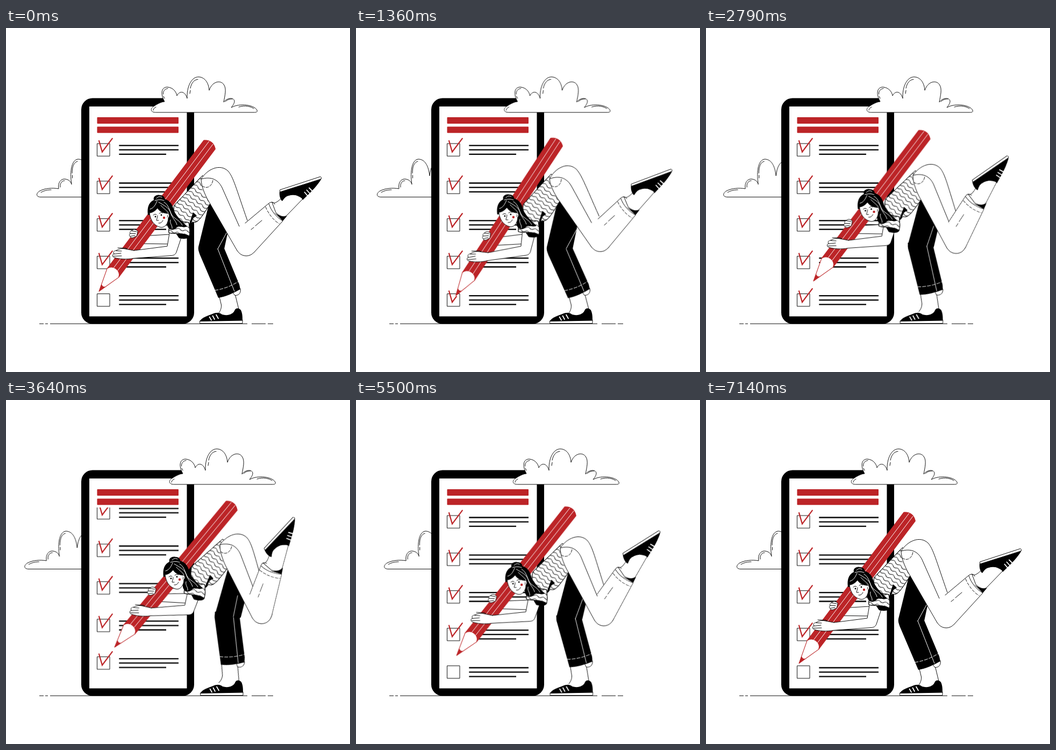
An HTML page without scripts for the animation above (7.21 s loop, 640 by 640 pixels).

```html
<!DOCTYPE html>
<html lang="en">
<head>
<meta charset="utf-8">
<title>Checklist</title>
<style>
  html, body { margin: 0; width: 100%; height: 100%; overflow: hidden; background: #fff; }
  svg { display: block; width: 100%; height: 100%; }

  .ink { fill: #fff; stroke: #111; stroke-width: 1; stroke-linecap: round; stroke-linejoin: round; }
  .line { fill: none; }
  .black { fill: #000; stroke: none; }
  .bare { stroke: none; }
  .white { fill: none; stroke: #fff; }
  .red { fill: #bc2427; stroke: none; }
  .tick { fill: none; stroke: #bc2427; stroke-width: 2.2; stroke-linecap: butt; stroke-linejoin: miter; }

  .part, .list, .front, .back, .draw { animation: 7.21s infinite; transform-box: view-box; }
  .part { animation-name: pose; }
  .list { animation-name: scroll; }
  .front { animation-name: front; }
  .back { animation-name: back; }
  .draw { animation-name: draw; stroke-dasharray: 100 100; }

  /* Every limb passes through the same poses: rest, down stroke, up stroke, stand back. */
  @keyframes pose {
    0%, 1.4%, 99%, 100% { transform: translate(0px, 0px) rotate(0deg); animation-timing-function: cubic-bezier(.45,0,.55,1); }
    12.2% { transform: var(--down); animation-timing-function: cubic-bezier(.45,0,.55,1); }
    26.8%, 29.2% { transform: var(--up); animation-timing-function: cubic-bezier(.5,0,.5,1); }
    46.8%, 56.2% { transform: var(--away); animation-timing-function: cubic-bezier(.4,0,.5,1); }
  }
  @keyframes draw {
    0%, 1.4% { stroke-dashoffset: 100; animation-timing-function: cubic-bezier(.45,0,.55,1); }
    12.2% { stroke-dashoffset: 58; animation-timing-function: cubic-bezier(.45,0,.55,1); }
    26.8%, 100% { stroke-dashoffset: 0; }
  }
  @keyframes scroll {
    0%, 43% { transform: translateY(0px); animation-timing-function: cubic-bezier(.37,0,.63,1); }
    65.9%, 100% { transform: translateY(-69.9px); }
  }
  @keyframes front {
    0%, 100% { transform: translateX(0px); animation-timing-function: cubic-bezier(.6,0,.4,1); }
    57.5% { transform: translateX(34.5px); animation-timing-function: cubic-bezier(.6,0,.4,1); }
  }
  @keyframes back {
    0%, 100% { transform: translateX(0px); animation-timing-function: cubic-bezier(.7,0,.3,1); }
    32.7% { transform: translateX(-25px); animation-timing-function: cubic-bezier(.6,0,.4,1); }
  }

  .hold { transform-origin: 173px 490px; --down: translate(4.3px,17px) rotate(-4.1deg); --up: translate(24px,-4px) rotate(-3.2deg); --away: translate(29px,-30px) rotate(2.6deg); }
  .head { --down: translate(-5px,-2px) rotate(0deg); --up: translate(4px,0px) rotate(0deg); --away: translate(29px,-19px) rotate(0deg); }
  .torso { transform-origin: 322px 385px; --down: translate(-5px,-4px) rotate(-1.5deg); --up: translate(5px,0px) rotate(0deg); --away: translate(28px,-20px) rotate(5deg); }
  .thigh { transform-origin: 380px 282px; --down: translate(-8px,-3px) rotate(-8.5deg); --up: translate(4px,0px) rotate(0deg); --away: translate(35px,-11px) rotate(2.9deg); }
  .shin { transform-origin: 447px 405px; --down: translate(0px,0px) rotate(3.9deg); --up: translate(0px,0px) rotate(0deg); --away: translate(0px,0px) rotate(-31.9deg); }
  .thigh2 { transform-origin: 382px 411px; --down: translate(-5px,0px) rotate(-1deg); --up: translate(0px,0px) rotate(0deg); --away: translate(31px,-8px) rotate(2deg); }
  .seam { transform-origin: 394px 411px; --down: translate(-5px,-1px) rotate(0deg); --up: translate(0px,0px) rotate(0deg); --away: translate(29px,-8px) rotate(-17deg); }
  .shin2 { transform-origin: 415px 525px; --down: translate(0px,0px) rotate(-2.4deg); --up: translate(0px,0px) rotate(0deg); --away: translate(-2px,-5px) rotate(15.5deg); }
  .ankle { transform-origin: 415px 528px; --down: translate(0px,0px) rotate(-1.5deg); --up: translate(0px,0px) rotate(0deg); --away: translate(0px,-1px) rotate(9deg); }
  .shoe { --down: translate(0px,0px) rotate(0deg); --up: translate(0px,0px) rotate(0deg); --away: translate(1px,0px) rotate(0deg); }
</style>
</head>
<body>
<svg viewBox="0 0 640 640">
  <defs>
    <clipPath id="page"><path d="M155 200H336.500V536.500H155Z"/></clipPath>
    <pattern id="wave" width="14" height="7.500" patternUnits="userSpaceOnUse" patternTransform="translate(363 277) rotate(37)">
      <path d="M-1 4.500L0 4q3.500-2.800 7 0t7 0l1-.5" fill="none" stroke="#111"/>
    </pattern>
    <pattern id="wave2" href="#wave" patternTransform="translate(305 366) rotate(14)"/>
    <path id="shirt" d="M365 275L313 330C309 350 318 372 335 374L347 361C356 364 362 356 384 320L390 290Z"/>
    <path id="sleeve" d="M308 358C304 368 302 376 303 381C312 384 328 380 341 387C343 378 341 370 340 362Z"/>
    <path id="mark" class="tick" pathLength="100" d="M172.800 209L179 230.500L198.300 204.800"/>
    <g id="row">
      <path d="M169.500 215H193V238.300H169.500Z" fill="none" stroke="#111"/>
      <path d="M210.300 218.600H321M210.300 226.700H321M210.300 234.900H298" fill="none" stroke="#000" stroke-width="2.300"/>
    </g>
    <g id="done"><use href="#row"/><use href="#mark"/></g>
  </defs>

  <g class="ink back">
    <path d="M172 314.500H64C55 314 56 307 63 303C73 298 86 297 98 299C96 288 102 280 110 281C118 282 121 287 122 291C118 264 123 245 134 244C146 244 153 256 155 275C157 258 162 249 172 246Z"/>
    <path class="line" d="M65 306C71 302 79 301 84 301M101 296C100 289 104 284 109 284M123.500 274V279M123 270C123 258 126 250 133 248"/>
  </g>

  <rect x="140" y="130.500" width="210" height="420" rx="21"/>
  <path d="M155 146H336.500V536.500H155Z" fill="#fff"/>
  <rect class="red" x="169.500" y="166" width="151.500" height="12" rx="1"/>
  <rect class="red" x="169.500" y="183.500" width="151.500" height="11.800" rx="1"/>
  <g clip-path="url(#page)">
    <g class="list">
      <use href="#done"/>
      <use href="#done" y="69.900"/>
      <use href="#done" y="139.700"/>
      <use href="#done" y="209.600"/>
      <g transform="translate(0 279.500)">
        <use href="#row"/>
        <path class="tick draw" pathLength="100" d="M172.800 209L179 230.500L198.300 204.800"/>
      </g>
      <use href="#row" y="349.400"/>
    </g>
  </g>
  <path d="M62 550.300H70M73 550.300H78M82 550.300H449M457 550.300H483M487 550.300H497" stroke="#111" stroke-width="1.100"/>

  <g class="ink front">
    <path d="M278 157C268 157 268 149 276 145C282 141 290 137 295 137C286 121 290 109 301 110C311 111 317 119 318 126C323 116 333 117 337 131C336 109 345 91 358 91C369 91 377 101 378 116C384 98 400 97 405 105C411 113 407 126 405 138C412 129 424 129 425 136C425 141 421 145 419 148C435 139 462 143 467 153C468 156 466 157 463 157Z"/>
    <path class="line" d="M295 131L293 127M292.500 123C292 117 296 113 301 112.500M342 122L343 116M343 112C345 101 351 96 357 95.500M408 137C412 133 416 132 421 132M433 147C444 143 456 146 461 150M274 153C274 150 276 149 279 147"/>
  </g>

  <!-- standing leg -->
  <g class="ink">
    <g class="part ankle">
      <path class="bare" d="M396 480L400.500 515L397 532L433 530L434 522L424 480Z"/>
      <path class="line" d="M395 492L400.500 515C401 521 399 526 396 530M423 482L433 523"/>
    </g>
    <g class="part shoe">
      <path d="M361 545L440 543V549.500H361Z"/>
      <path class="black" d="M360.500 546C363 539 376 535 384 532C391 529 397 529 402 533C412 536 423 533 426 524C429 520 434 521 437 525C440 531 440 538 440 544.500Z"/>
      <path class="white" stroke-width="1.800" d="M378.500 537.500L382 543.500M384.500 535.500L388 542M391 533.500L395 540.500"/>
    </g>
    <path class="black part thigh2" d="M381 313L358 407Q357 413 360 419L395 424L406 411L419 350Z"/>
    <g class="part shin2">
      <path d="M422 491L436 485C437.500 493 433 498 426 497.500Z"/>
      <path class="black" d="M358 410L360 420L395 502C408 500 424 493 436 486L434 477L406 410L382 402Z"/>
      <path class="white" d="M394 411L425 490"/>
      <path class="white" stroke-dasharray="6 3" d="M389 488C403 486 420 480 433 471"/>
    </g>
    <path class="white part seam" d="M413 376L394 411"/>
  </g>

  <!-- pencil and arms -->
  <g class="part hold ink">
    <path d="M236 388L304 384L310 402L236 401Z"/>
    <g transform="translate(173 490) rotate(37)">
      <path stroke="#bc2427" d="M0 0L-13.500 -43L-8 -54H8L13.500 -43Z"/>
      <path class="red" d="M0 0L-4.600 -14Q0 -10 4.600 -14Z"/>
      <path class="red" d="M-14 -42V-342Q0 -354 14 -342V-42C11 -49 6 -52 0 -52S-11 -49 -14 -42Z"/>
      <path class="white" stroke-width=".9" d="M-4.500 -52V-346M4.500 -52V-346"/>
    </g>
    <path d="M245 378C242 374 236 374 234 377C231 378 230 380 231 382C229 384 229 387 231 387.500C231 391 236 391 239 389L243 387Z"/>
    <path class="line" d="M234 377.500L243 379M231 382.500L241 382.500M231.500 387.500L240 386"/>
    <path d="M238 414L300 406L306 370L332 372L317 417C315 422 312 423 307 423.500L237 428.500C224 431 211 430 201 427C197 425 198 421 201 420C199 417 201 414 205 414C211 410 217 410 222 411L238 414Z"/>
    <path class="line" d="M201 420.500L214 419M200 424.500L215 424M205 414.500L215 415M208 409L223 409.500L226 411.500"/>
  </g>

  <!-- torso -->
  <g class="part torso ink">
    <use href="#shirt"/>
    <use href="#shirt" style="fill: url(#wave)"/>
    <path class="black" d="M340 368L345 352L348 343L355 349L348 354L344 366Z"/>
    <path class="black" d="M316 382C323 378 336 379 342 386C341 393 330 393 322 391Z"/>
    <use href="#sleeve"/>
    <use href="#sleeve" style="fill: url(#wave2)"/>
  </g>

  <!-- raised leg -->
  <g class="part thigh ink">
    <circle cx="447" cy="405" r="19"/>
    <path class="bare" d="M363 281C375 262 398 252 413 266C423 277 428 298 449 358L464 396L447 405L430.500 415L378 324C366 306 362 295 363 281Z"/>
    <path class="line" d="M430.500 415L378 324C373 316 363 296 363 281C375 262 398 252 413 266C423 277 428 298 449 358M363 281C381 276 394 281 402 297L434 369"/>
    <path class="line" stroke-dasharray="5 2.500" d="M365 294C374 300 383 295 385 283"/>
    <g class="part shin">
      <path class="bare" d="M445 363L488 327L497 323L515 359L461 418L447 405Z"/>
      <path d="M495 324C499 328 505 324 514 315L530 306L553 317L523 348C518 354 508 350 502 343Z"/>
      <path class="black" d="M499 343L515 359L523 349.500C515 353 507 349 499 343Z"/>
      <path class="line" d="M445 363L488 327C492 323 498 323 500 328M489 327C493 340 503 352 515 359L461 418M456 375L461 371M464 368L476 358"/>
      <path class="line" stroke-dasharray="5 3" d="M483 333C488 345 497 357 508 364"/>
      <path class="black" d="M509 304L587 280C582 290 570 303 552 320C549 312 536 309 526 312C520 313 517 318 514 322C510 319 508 311 509 304Z"/>
      <path d="M510 301L585 276.500Q588 278 586 281L510 305Z"/>
      <path class="white" stroke-width="1.800" d="M555.500 305.500L560.500 311.500M559.500 301.500L565 307.500M564 297.500L570 303.500"/>
    </g>
  </g>

  <!-- head -->
  <g class="part head ink">
    <path class="black" d="M264 348C262 334 266 324 275 320C273 313 281 309 287 311C292 311 296 315 295 318C304 321 309 327 311 335C314 348 325 357 337 369C332 372 327 369 324 370C318 368 318 373 312 375C306 377 299 372 300 363L285 345Z"/>
    <path d="M267 344C272 344 278 340 282 335C286 342 293 344 299 345C304 344 305 350 302 353C302 362 297 371 289 371C278 369 269 361 267 344Z"/>
    <path class="white" d="M268 337C275 335 278 329 281 322M277 321C283 319 289 319 294 321M284 324C294 330 303 334 306 343C309 354 316 358 318 366M294 324C305 330 304 345 312 352C320 358 325 361 328 367M288 330C294 337 301 340 302 345M306 357C304 364 310 367 309 373M280 317C283 313 287 313 290 315"/>
    <path class="line" d="M274 348Q277 345 280 347M285 345Q288 342 292 344M282 349C282 353 280 356 280 358L284 358M284 363Q289 364 292 358M300 348Q302 349 300 352"/>
    <circle class="black" cx="278" cy="351" r="1.400"/>
    <circle class="black" cx="289" cy="348" r="1.400"/>
    <circle class="red" cx="294" cy="353" r="2.200"/>
  </g>
</svg>
</body>
</html>
```
